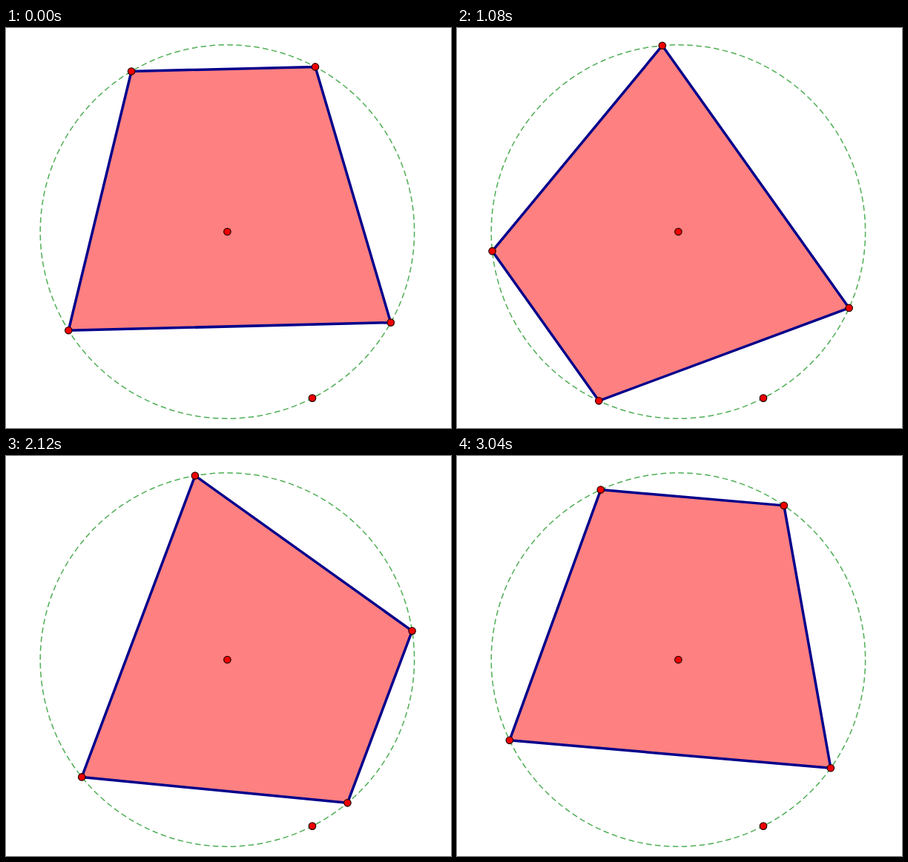
An HTML page for the animation above (3080 ms loop, 600x540 px).

```html
<!DOCTYPE html>
<html lang="en">
<head>
<meta charset="utf-8">
<title>Quadrilateral turning in a circle</title>
<style>
  html, body { margin: 0; width: 100%; height: 100%; overflow: hidden; background: #fff; }
  svg { display: block; width: 600px; height: 540px; }
  .ring { fill: none; stroke: #4fae55; stroke-width: 1.5; stroke-dasharray: 7.6 4.4; }
  .shape { fill: #ff8080; stroke: #00008b; stroke-width: 3.5; stroke-linejoin: round; }
  .dot { fill: #f00000; stroke: #2a0000; stroke-width: 1.3; }
</style>
</head>
<body>
<svg id="stage" viewBox="0 0 600 540"></svg>
<script>
const CX = 298.4, CY = 275, R = 252.2;
const LOOP = 3080, TICK = 40;
const TURN = 4.593;      // degrees per tick
const SKIP_TICK = 36;    // the motion jumps one extra step here
const CORNERS = [120.85, 61.95, -29.1, -148.1];

const stage = document.getElementById('stage');

function add(tag, attrs) {
  const el = document.createElementNS('http://www.w3.org/2000/svg', tag);
  for (const key in attrs) el.setAttribute(key, attrs[key]);
  return stage.appendChild(el);
}

const addDot = (cx, cy) => add('circle', { class: 'dot', cx, cy, r: 4.7 });

function onRing(deg) {
  const a = deg * Math.PI / 180;
  return [CX + R * Math.cos(a), CY - R * Math.sin(a)];
}

add('circle', { class: 'ring', cx: CX, cy: CY, r: R });
const shape = add('polygon', { class: 'shape' });
addDot(CX, CY);
addDot(413, 499.6);
const dots = CORNERS.map(() => addDot(0, 0));

function draw() {
  const tick = Math.floor(performance.now() % LOOP / TICK);
  const turn = TURN * (tick + (tick >= SKIP_TICK ? 1 : 0));
  const points = CORNERS.map(deg => onRing(deg + turn));
  shape.setAttribute('points', points.join(' '));
  points.forEach(([x, y], i) => {
    dots[i].setAttribute('cx', x);
    dots[i].setAttribute('cy', y);
  });
  requestAnimationFrame(draw);
}
draw();
</script>
</body>
</html>
```
